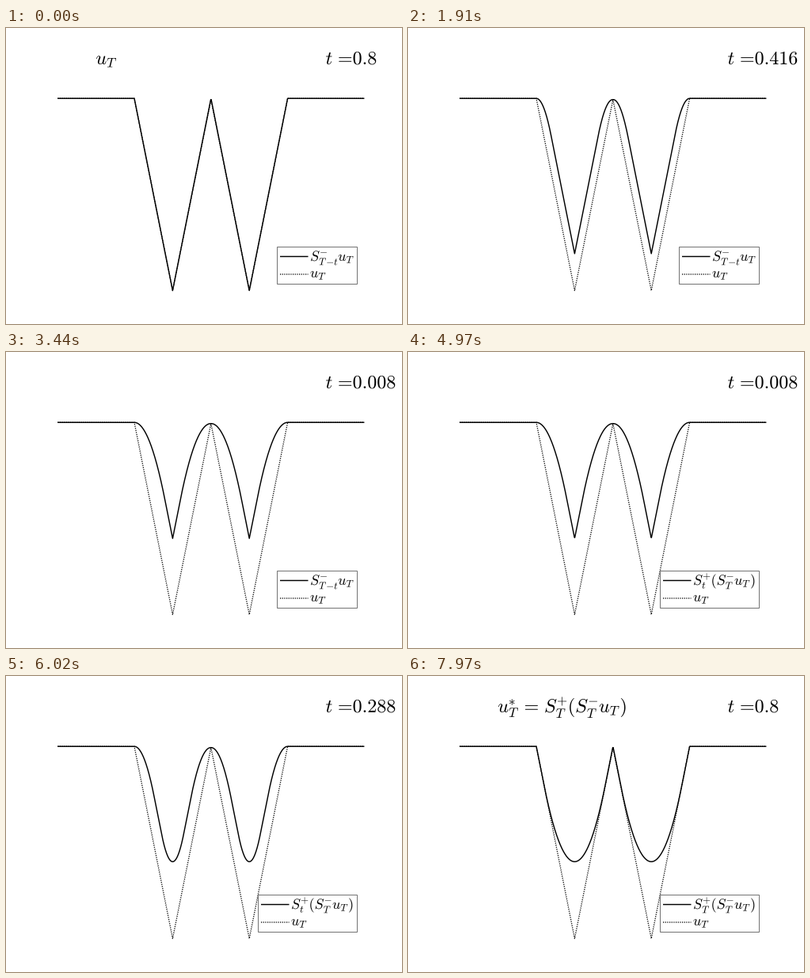
A matplotlib script for the animation above (8000 ms loop, 500 by 375 pixels).

```python
from functools import lru_cache

import numpy as np
import matplotlib.pyplot as plt
from matplotlib.animation import FuncAnimation
from matplotlib.patches import PathPatch, Rectangle
from matplotlib.path import Path
from matplotlib.textpath import TextPath
from matplotlib.transforms import Affine2D

plt.rcParams["mathtext.fontset"] = "cm"

W, H, DPI = 500, 375, 100
PX = 72 / DPI
TICK, STEP_MS, LOOP_MS = 10, 30, 8000
BACK_START, FORWARD_START = 500, 4970
STEPS, DT = 100, 0.008
T = STEPS * DT

# Math layout in em units: advances, italic corrections, side bearings
ADVANCE = {"u": .572, "S": .613, "T": .584, "t": .361, "(": .389, ")": .389,
           "=": .778, "+": .778, "-": .778, "*": .5, ".": .278}
ITALIC = {"S": .058, "T": .139}
BEARING = {"=": .056, "+": .056, "-": .083, "*": .065}
SCRIPT, SCRIPT_GAP, THICK = .7, .028, .278


@lru_cache(None)
def glyph(char):
    path = TextPath((0, 0), f"${char}$", size=1)
    if char in BEARING:
        shift = BEARING[char] - path.get_extents().x0
        path = path.transformed(Affine2D().translate(shift, 0))
    return path


def run(text, x, y, scale):
    """Set characters side by side; return their paths and the end position."""
    paths = []
    for char in text:
        place = Affine2D().scale(scale).translate(x, y)
        paths.append(glyph(char).transformed(place))
        x += scale * (ADVANCE.get(char, .5) + ITALIC.get(char, 0))
    return paths, x


@lru_cache(None)
def formula(x, y, em, atoms):
    """Path of a formula; atoms are (base, superscript, subscript)."""
    paths, pen = [], 0
    for base, sup, sub in atoms:
        if base == "=":
            pen += THICK
        base_paths, end = run(base, pen, 0, 1)
        paths += base_paths
        if sup or sub:
            rise = .363 if sup == "*" else .403
            drop = .15 if not sup else .25 if sup == "*" or sub == "t" else .293
            sup_paths, sup_end = run(sup, end, rise, SCRIPT)
            sub_start = end - ITALIC.get(base, 0)
            sub_paths, sub_end = run(sub, sub_start, -drop, SCRIPT)
            paths += sup_paths + sub_paths
            end = max(sup_end, sub_end) + SCRIPT_GAP
        pen = end
        if base == "=" and len(atoms) > 3:
            pen += THICK
    place = Affine2D().scale(em, -em).translate(x, y)
    return Path.make_compound_path(*paths).transformed(place)


U_T = ("u", "", "T")


def composed(time):
    return (("S", "+", time), ("(", "", ""), ("S", "-", "T"), U_T, (")", "", ""))


START_TITLE = (U_T,)
END_TITLE = (("u", "*", "T"), ("=", "", "")) + composed("T")
BACK_LABEL = (("S", "-", "T-t"), U_T)


def readout(t):
    return ("t", "", ""), ("=", "", ""), (f"{t:.3g}", "", "")


# Hamilton-Jacobi evolution by sup- and inf-convolution
GRID = np.linspace(-2, 2, 801)
TARGET = np.minimum(np.abs(np.abs(GRID) - 1) - 1, -.006 * (np.abs(GRID) < .5))
DIST2 = (GRID[:, None] - GRID) ** 2 / 2


def backward(tau):
    return TARGET if tau <= 0 else np.max(TARGET - DIST2 / tau, axis=1)


INITIAL = backward(T)


def forward(t):
    return np.min(INITIAL + DIST2 / t, axis=1)


def to_pixels(values):
    return 89.2 - 243.4 * np.concatenate(([0], values, [0]))


@lru_cache(None)
def solution(is_forward, step):
    return to_pixels(forward(step * DT) if is_forward else backward(step * DT))


XS = 258.8 + 48.4 * np.concatenate(([-4], GRID, [4]))

fig = plt.figure(figsize=(W / DPI, H / DPI), dpi=DPI, facecolor="white")
ax = fig.add_axes([0, 0, 1, 1])
ax.set(xlim=(0, W), ylim=(H, 0))
ax.axis("off")

SOLID = dict(color="black", lw=1.45 * PX, solid_joinstyle="round",
             solid_capstyle="butt", snap=False)
DOTTED = dict(color="black", lw=1.3 * PX, ls=(0, (.95, 1.1)),
              dash_capstyle="butt", snap=False)

KNOTS = 258.8 + 48.4 * np.array([-4, -2, -1, 0, 1, 2, 4])
ax.plot(KNOTS, [89.2, 89.2, 332.6, 90.7, 332.6, 89.2, 89.2], zorder=2, **DOTTED)
curve, = ax.plot(XS, to_pixels(TARGET), zorder=3, **SOLID)

LEGEND_RIGHT, LEGEND_TOP, LEGEND_BOTTOM = 442.5, 276.5, 323.5
legend_box = ax.add_patch(Rectangle((341.5, LEGEND_TOP), 1, LEGEND_BOTTOM - LEGEND_TOP,
                                    fc="white", ec="0.45", lw=PX, zorder=4))
solid_key, = ax.plot([], [], zorder=5, **SOLID)
dotted_key, = ax.plot([], [], zorder=5, **DOTTED)


def ink():
    patch = PathPatch(Path([(0, 0)]), fc="black", lw=0, zorder=6)
    return ax.add_patch(patch)


title, clock, solid_label, dotted_label = (ink() for _ in range(4))


def set_legend(left, atoms):
    legend_box.set_x(left)
    legend_box.set_width(LEGEND_RIGHT - left)
    for key, y in ((solid_key, 289.5), (dotted_key, 312)):
        key.set_data([left + 4.5, left + 40], [y, y])
    solid_label.set_path(formula(left + 42.5, 295, 18.1, atoms))
    dotted_label.set_path(formula(left + 42.5, 316, 18.1, (U_T,)))


def update(frame):
    ms = frame * TICK
    is_forward = ms >= FORWARD_START
    start = FORWARD_START if is_forward else BACK_START
    count = (ms - start) // STEP_MS + 1 if ms >= start else 0
    step = min(count, STEPS)
    finished = is_forward and count > STEPS
    t = (step if is_forward else STEPS - step) * DT

    curve.set_ydata(solution(is_forward, step))
    clock.set_path(formula(403.6, 46, 24, readout(t)))
    title.set_visible(finished or ms < BACK_START)
    title.set_path(formula(113.4, 46, 24, END_TITLE if finished else START_TITLE))
    if is_forward:
        set_legend(317.5, composed("T" if finished else "t"))
    else:
        set_legend(341.5, BACK_LABEL)
    return curve, clock, title


animation = FuncAnimation(fig, update, frames=LOOP_MS // TICK, interval=TICK,
                          repeat=True, repeat_delay=0, cache_frame_data=False)
plt.show()
```
